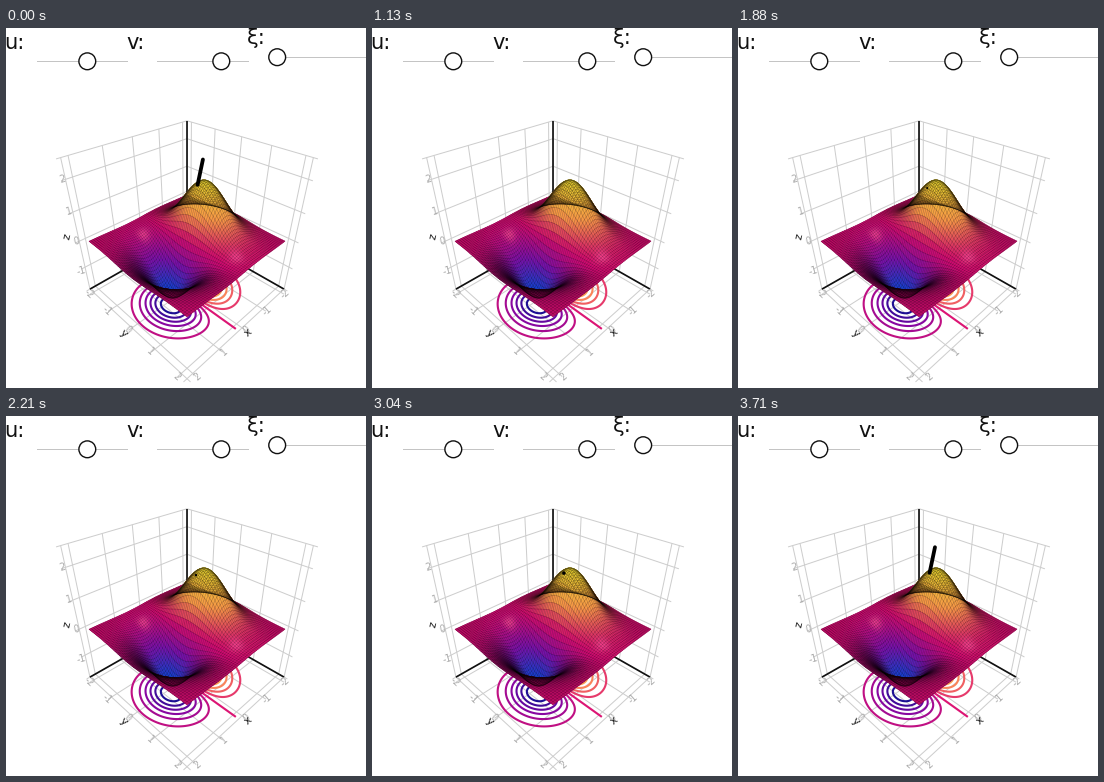
A matplotlib script that plays this animation: 360x360 px, repeating every 3.75 s.

```python
import numpy as np
import matplotlib.pyplot as plt
from matplotlib.animation import FuncAnimation
from matplotlib.collections import LineCollection, PolyCollection
from matplotlib.colors import LinearSegmentedColormap

SIZE, FRAMES, LOOP = 360, 90, 3750
HALF, LOW, HIGH = 2.2, -1.94, 2.6         # box extents
SIN, COS = 0.565, 0.825                   # camera pitch
FOCAL, DIST, CX, CY = 336.7, 3.07, 181, 204.5
CONTOUR_Z = -2.16

fig = plt.figure(figsize=(SIZE / 72, SIZE / 72), dpi=72, facecolor="white")
ax = fig.add_axes([0, 0, 1, 1])
ax.set(xlim=(0, SIZE), ylim=(SIZE, 0))
ax.axis("off")


def project(x, y, z):
    right = (x + y) / (2 * HALF)
    near = (y - x) / (2 * HALF)
    up = 0.314 * z - 0.098
    depth = DIST - near * COS - up * SIN
    return (CX + FOCAL * right / depth,
            CY - FOCAL * (up * COS - near * SIN) / depth)


def height(x, y):
    return 4 * x * np.exp(-x**2 - y**2)


def segments(pairs, color, width, zorder):
    lines = [[project(*a), project(*b)] for a, b in pairs]
    ax.add_collection(LineCollection(lines, colors=color, linewidths=width,
                                     zorder=zorder))


def label(x, y, text, size, color, angle=0):
    ax.text(x, y, text, fontsize=size, color=color, rotation=angle,
            family="DejaVu Sans", ha="center", va="center")


def draw_box():
    over = HALF + 0.12
    grid = []
    for k in (-HALF, -2, -1, 0, 1, 2, HALF):
        grid += [((k, -HALF, LOW), (k, over, LOW)),
                 ((HALF, k, LOW), (-over, k, LOW)),
                 ((k, -HALF, LOW), (k, -HALF, HIGH)),
                 ((HALF, k, LOW), (HALF, k, HIGH))]
    for k in (-1, 0, 1, 2, HIGH):
        grid += [((HALF, -HALF, k), (-over, -HALF, k)),
                 ((HALF, -HALF, k), (HALF, over, k))]
    segments(grid, "#cdcdcd", 1, 1)
    back = (HALF, -HALF, LOW)
    segments([(back, (HALF, -HALF, HIGH)), (back, (-HALF, -HALF, LOW)),
              (back, (HALF, HALF, LOW))], "#111111", 1.7, 2)


def draw_labels():
    gray = "#adadad"
    for text, x, y in (("2", 56, 151), ("1", 63, 183), ("0", 70, 213),
                       ("-1", 75, 243)):
        label(x, y, text, 9.5, gray, 15)
    for k in (-2, -1, 0, 1, 2):
        x, y = project(-HALF - 0.16, k, LOW)
        label(x, y - 1, str(k), 9.5, gray, -42)
        x, y = project(-k, HALF + 0.16, LOW)
        label(x, y - 1, str(k), 9.5, gray, 42)
    label(61, 209, "z", 11, "#222222", 77)
    label(117.5, 305, "y", 11, "#222222", -42)
    label(242.5, 305, "x", 11, "#222222", 42)


def draw_contours():
    cmap = LinearSegmentedColormap.from_list(
        "levels", ["#0d1090", "#8206a4", "#dc1474", "#fc8a58", "#fcd23c"])
    x, y = np.meshgrid(np.linspace(-2, 2, 121), np.linspace(-2, 2, 121))
    ax.contour(*project(x, y, CONTOUR_Z), height(x, y),
               levels=np.arange(-6, 7) * 0.25, cmap=cmap, vmin=-1.6, vmax=1.6,
               linewidths=2.1, linestyles="solid", zorder=3)


def draw_surface(n=60):
    cmap = LinearSegmentedColormap.from_list(
        "surface", ["#0a46d2", "#7810aa", "#d20a6e", "#f59646", "#f0d732"])
    t = np.linspace(-2, 2, n + 1)
    x, y = np.meshgrid(t, t)
    pts = np.stack(project(x, y, height(x, y)), axis=-1)
    quads = np.stack([pts[:-1, :-1], pts[:-1, 1:], pts[1:, 1:], pts[1:, :-1]],
                     axis=2).reshape(-1, 4, 2)

    mid = (t[1:] + t[:-1]) / 2
    mx, my = (m.ravel() for m in np.meshgrid(mid, mid))
    fall = 4 * np.exp(-mx**2 - my**2)
    sx, sy = fall * (1 - 2 * mx**2), -2 * fall * mx * my
    facing = (SIN + COS * (sx - sy) / np.sqrt(2)) / np.sqrt(1 + sx**2 + sy**2)
    shade = np.clip(0.45 + 0.85 * facing, 0.15, 1)
    rgb = cmap((height(mx, my) / 1.72 + 1) / 2)[:, :3] * shade[:, None]
    for gx, gy in ((-0.5, -1.4), (0.3, 1.55)):
        glow = 0.7 * np.exp(-((mx - gx)**2 + (my - gy)**2) / 0.035)[:, None]
        rgb += (np.array([1, 0.3, 0.6]) - rgb) * glow

    order = np.argsort(my - mx, kind="stable")
    ax.add_collection(PolyCollection(quads[order], facecolors=rgb[order],
                                     edgecolors="face", linewidths=0.6,
                                     zorder=4))
    # the wires also show through from the far side
    wires = list(pts) + list(pts.transpose(1, 0, 2))
    ax.add_collection(LineCollection(wires, colors=(0, 0, 0, 0.3),
                                     linewidths=0.5, zorder=5))


def draw_slider(text, tx, ty, x0, x1, y, knob):
    label(tx, ty, text, 21, "#111111")
    ax.plot([x0, x1], [y, y], color="#c4c4c4", lw=1, zorder=5)
    ax.add_patch(plt.Circle((knob, y), 8.4, fc="white", ec="#111111", lw=1.4,
                            zorder=6))


draw_box()
draw_labels()
draw_contours()
draw_surface()
draw_slider("u:", 8.5, 15, 31, 121, 33.3, 81.3)
draw_slider("v:", 130, 15, 151, 242, 33.3, 215.3)
draw_slider("ξ:", 250, 10.5, 263, 361, 29.2, 271.2)

rod, = ax.plot([], [], color="black", lw=3.8, solid_capstyle="round", zorder=8)
dot = ax.add_patch(plt.Circle((0, 0), 1, fc="black", lw=0, zorder=8))
BASE = (191.6, 156.8)


def update(i):
    ms = i * LOOP / FRAMES
    tip = 131.2 + 58.7 * (1 - np.cos(2 * np.pi * (ms + 60) / LOOP))
    shown = tip < BASE[1]
    rod.set_visible(shown)
    rod.set_data([BASE[0], BASE[0] + (BASE[1] - tip) * 0.21], [BASE[1], tip])

    # the end just grazes the surface before it rises again
    dot.set_visible(not shown and ms > 1700)
    p = (ms - 1880) / 1160
    dot.center = (189.2 + 2.8 * p, 160 - 3 * p)
    dot.set_radius(1.0 + 0.8 * max(p, 0))
    return rod, dot


anim = FuncAnimation(fig, update, frames=FRAMES, interval=LOOP / FRAMES,
                     repeat=True, repeat_delay=0, blit=False)
plt.show()
```
